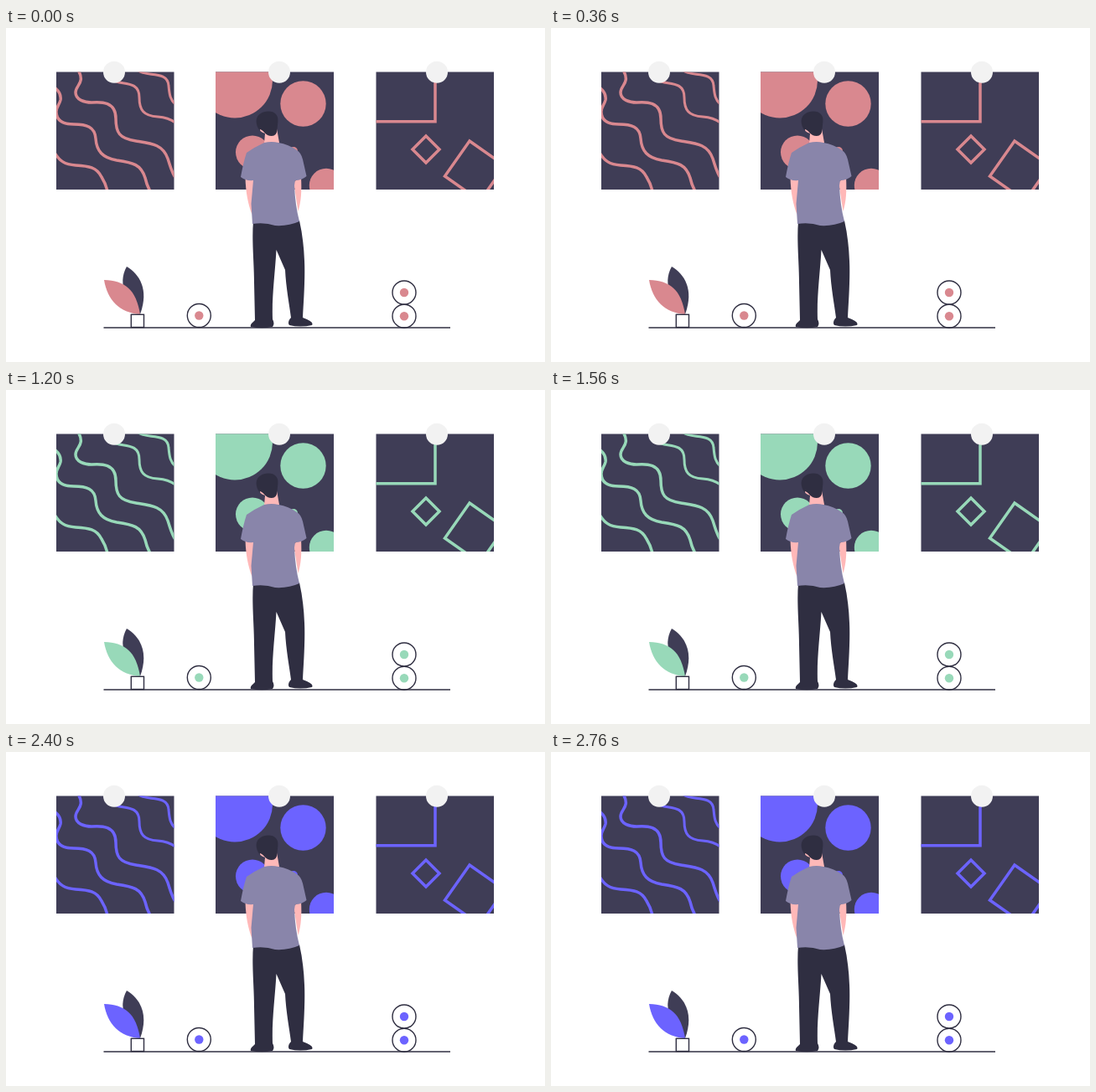
Recreate the animation shown at these times as an HTML page. Size 643 by 399 pixels, loop 3 s.

```html
<!DOCTYPE html>
<html lang="en">
<head>
<meta charset="utf-8">
<title>Gallery visitor</title>
<style>
  html, body { margin: 0; width: 100%; height: 100%; overflow: hidden; background: #fff; }
  svg { display: block; width: 100vw; height: 100vh; }
  .dark { fill: #3f3d56; }
  .cloth { fill: #2f2e41; }
  .skin { fill: #ffb8b8; }
  .shirt { fill: #8985aa; }
  .pin { fill: #f2f2f2; }
  .fill { fill: var(--accent); }
  .line { fill: none; stroke: var(--accent); stroke-width: 3.5; }
  .outline { fill: #fff; stroke: #2f2e41; stroke-width: 1.4; }
</style>
</head>
<body>
<svg id="scene" viewBox="0 0 643 399">
  <defs>
    <clipPath id="panels">
      <path d="M60 52.5h140.5V193H60zM250 52.5h141V193H250zM441.5 52.5H582V193H441.5z"/>
    </clipPath>
    <g id="ball">
      <circle class="outline" r="14"/>
      <circle class="fill" r="5.2"/>
    </g>
  </defs>

  <g clip-path="url(#panels)">
    <rect class="dark" x="60" y="52" width="522" height="142"/>
    <g class="line">
      <path d="M86 50C95 66 83 68 83 77C83 86 94 89 102 89C114 88 131 88 131 108C131 125 135 132 155 135C174 138 187 139 193 156C196 165 198 174 203 180"/>
      <path d="M58 71C63 75 66 80 65 86C64 91 60 94 60 100C60 111 69 115 81 115C96 115 106 118 107 132C108 147 115 155 132 158C152 161 161 163 166 179Q168 188 172 195"/>
      <path d="M58 149C64 159 70 163 83 164C99 165 108 166 114 178Q119 186 121 195"/>
      <path stroke-width="3" d="M127 62C136 69 159 61 159 83C159 98 164 105 181 106Q194 107 202 113"/>
      <path stroke-width="3" d="M158 51C167 59 193 50 194 69C195 80 196 86 202 91"/>
      <path d="M440 111.700H512V50M501 129L517 145L501 161L485 145ZM553 135L523.500 177L565.500 206.500L595 164.500Z"/>
    </g>
    <g class="fill">
      <circle cx="273" cy="62.500" r="45"/>
      <circle cx="354.500" cy="90.500" r="27.200"/>
      <circle cx="294" cy="148.500" r="20"/>
      <circle cx="343" cy="147" r="5"/>
      <circle cx="382" cy="188" r="20.200"/>
    </g>
  </g>
  <g class="pin">
    <circle cx="129" cy="52.800" r="13"/>
    <circle cx="326" cy="52.800" r="13"/>
    <circle cx="514" cy="52.800" r="13"/>
  </g>

  <path class="dark" d="M144 285C159 294 171 312 160 342C145 326 132 307 144 285Z"/>
  <path class="fill" d="M117 301C142 302 155 312 160 342C135 340 121 325 117 301Z"/>
  <rect class="outline" x="149.300" y="342.300" width="15.200" height="15.200"/>
  <use href="#ball" x="230.300" y="343.500"/>
  <use href="#ball" x="475" y="344.200"/>
  <use href="#ball" x="475" y="316"/>
  <path class="outline" d="M116.500 358H530"/>

  <path class="skin" d="M302 119Q302 124 309 126L308 138Q317 143 326 137L323 120Z"/>
  <path class="skin" d="M285.500 179C286 197 289 211 293.500 223L297 180ZM352 178C353 195 352 208 348.500 219L343 184Z"/>
  <path class="cloth" d="M303 123C297 115 297 106 304 102C308 99 318 98 322 103C326 107 324 114 323.500 121Q323 129 317 129C309 129 308 122 303 121Z"/>
  <path class="cloth" d="M295 231C293 253 296 282 296 304L297 349C293 353 291 354 292 357Q305 359.500 318 357Q321 353 318 348C317 320 321 293 322.500 265L333 289C334 310 338 330 340 346C337 349 336 353 338 355Q351 358 365 355Q368 351 354 346C355 327 357 299 356 278Q355 252 350 230Z"/>
  <path class="shirt" d="M308 137Q317 135 325 137Q337 139 347 146Q352 149 354 157L358.500 177Q353 182 345 182L344 188Q345 212 350 231Q337 237 321 236Q309 232 294 234L292.500 210L295 182Q286 183 280 178C282 167 284 158 287 149Q297 142 308 137Z"/>
</svg>
<script>
  const accents = ["#d9888f", "#c2d072", "#98d9b9", "#cd97d9", "#6c63ff"];
  const step = 600;
  const scene = document.getElementById("scene");

  function draw() {
    const index = Math.floor(performance.now() / step) % accents.length;
    scene.style.setProperty("--accent", accents[index]);
    requestAnimationFrame(draw);
  }
  draw();
</script>
</body>
</html>
```
